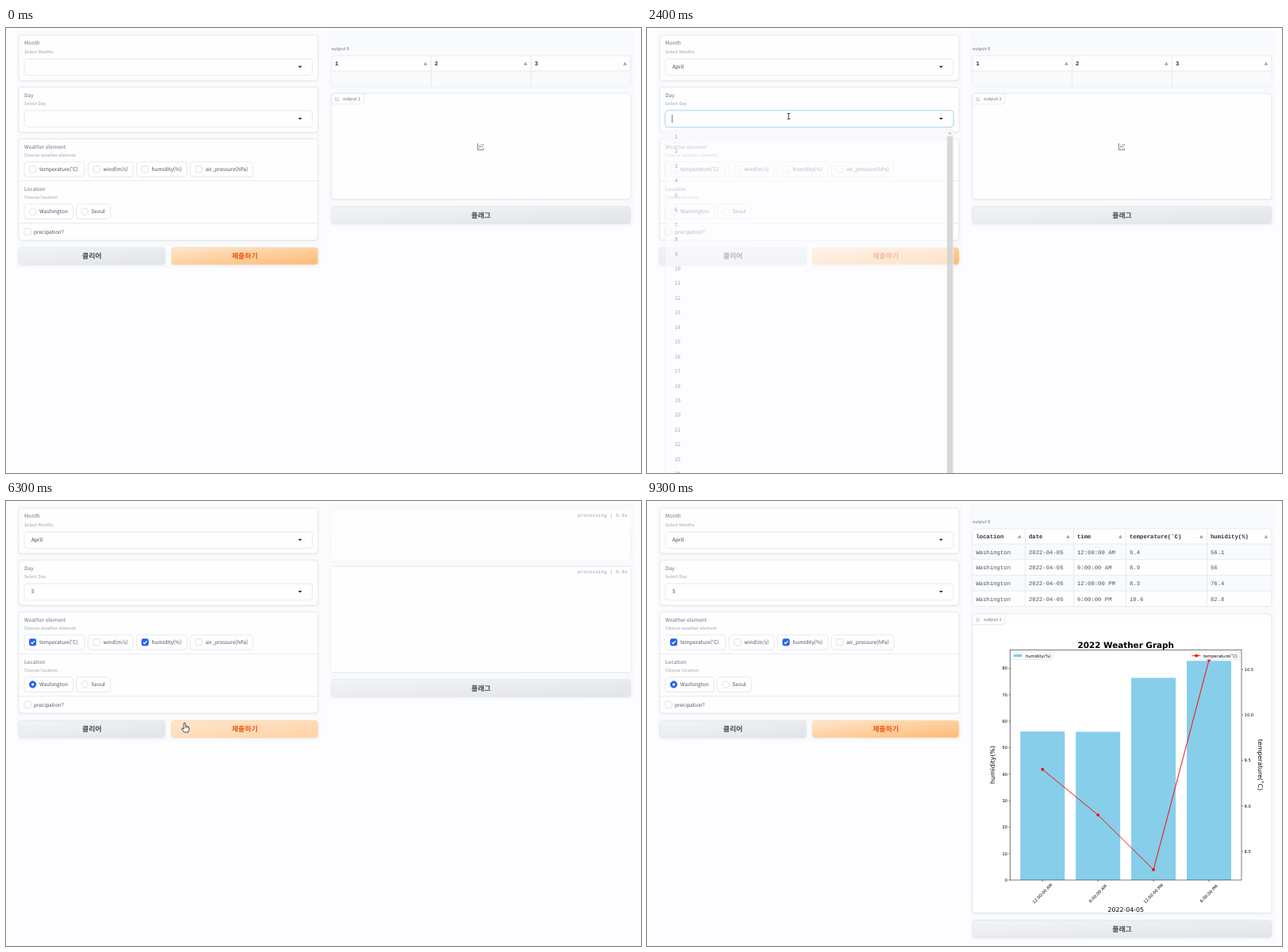
These frames come from a looping animation (800x560 px, 9.4 s). An HTML page with a canvas:

```html
<!DOCTYPE html>
<html lang="ko">
<head>
<meta charset="utf-8">
<title>Weather form</title>
<style>
html, body { margin: 0; width: 100%; height: 100%; overflow: hidden; background: #fdfdff; }
canvas { display: block; }
</style>
</head>
<body>
<canvas id="stage" width="800" height="560"></canvas>
<script>
const ctx = document.getElementById('stage').getContext('2d');
ctx.textRendering = 'geometricPrecision';
const LOOP = 9400, STEP = 100;
const SANS = '"Noto Sans CJK KR", "Noto Sans CJK JP", "Noto Sans CJK", "Noto Sans CJK SC", sans-serif';
const MONO = '"Liberation Mono", "Noto Sans Mono", monospace';
const PLOT = '"DejaVu Sans", sans-serif';
const CARD = '#fefeff', PANEL = '#f8fafc', LINE = '#e3e6eb';
const BODY = 6.5, SMALL = 5.55, CODE = 7.25;
const MONTHS = ['January', 'February', 'March', 'April', 'May', 'June', 'July',
  'August', 'September', 'October', 'November', 'December'];
const DAYS = Array.from({ length: 31 }, (_, i) => String(i + 1));
const TIMES = ['12:00:00 AM', '6:00:00 AM', '12:00:00 PM', '6:00:00 PM'];
const TEMPS = [9.4, 8.9, 8.3, 10.6];
const HUMIDITY = [56.1, 56, 76.4, 82.8];

// Moments of the clicks and of the answer.
const AT = { month: 870, april: 1650, day: 2348, five: 2950, blur: 3450,
  temperature: 3680, humidity: 4180, washington: 4680, submit: 5380, result: 6400 };

// Pointer path: time, x, y, and the shape used from that time on.
const PATH = [
  [300, 236, 190, 'arrow'], [700, 225, 56, 'beam'], [1000, 224.5, 50, 'beam'],
  [1200, 220, 52, 'hand'], [1600, 72, 121, 'hand'], [1800, 80, 121, 'arrow'],
  [2200, 176, 112, 'beam'], [2400, 178.5, 111, 'beam'], [2500, 174, 116, 'hand'],
  [2900, 62, 206, 'hand'], [3100, 64, 205, 'arrow'], [3400, 76, 186, 'hand'],
  [3600, 76.5, 181.5, 'hand'], [3750, 78, 181, 'arrow'], [4050, 186, 178, 'hand'],
  [4250, 186, 178, 'arrow'], [4600, 60, 229, 'hand'], [4800, 62, 230, 'arrow'],
  [5100, 130, 264, 'arrow'], [5200, 225, 278.5, 'hand'], [6300, 225, 279, 'hand'],
  [6450, 238, 308, 'arrow'], [6700, 243.5, 319, 'arrow'], [7200, 243.5, 319, 'arrow'],
  [7700, 590, 410, 'arrow'], [8100, 640, 470, 'arrow'], [8500, 602, 400, 'arrow'],
  [8900, 585, 565, 'arrow']
];

function text(str, x, y, { size = BODY, color = '#4b5563', weight = 400, font = SANS, align = 'left' } = {}) {
  ctx.font = `${weight} ${size}px ${font}`;
  ctx.fillStyle = color;
  ctx.textAlign = align;
  ctx.fillText(str, x, y + size * 0.366);
}

function turned(str, x, y, angle, style) {
  ctx.save();
  ctx.translate(x, y);
  ctx.rotate(angle);
  text(str, 0, 0, { font: PLOT, color: '#000', align: 'center', ...style });
  ctx.restore();
}

function rect(x1, y1, x2, y2, color) {
  ctx.fillStyle = color;
  ctx.fillRect(x1, y1, x2 - x1, y2 - y1);
}

function box(x1, y1, x2, y2, { fill = CARD, stroke = LINE, r = 4, shadow = 0, width = 0.8 } = {}) {
  ctx.beginPath();
  ctx.roundRect(x1, y1, x2 - x1, y2 - y1, r);
  ctx.save();
  if (shadow) {
    ctx.shadowColor = `rgba(40,50,70,${shadow})`;
    ctx.shadowBlur = 2;
    ctx.shadowOffsetY = 0.8;
  }
  ctx.fillStyle = fill;
  ctx.fill();
  ctx.restore();
  if (!stroke) return;
  ctx.strokeStyle = stroke;
  ctx.lineWidth = width;
  ctx.stroke();
}

function path(points, { fill, stroke, width = 0.8, close = false }) {
  ctx.beginPath();
  points.forEach(([x, y]) => ctx.lineTo(x, y));
  if (close) ctx.closePath();
  if (fill) { ctx.fillStyle = fill; ctx.fill(); }
  if (stroke) { ctx.strokeStyle = stroke; ctx.lineWidth = width; ctx.stroke(); }
}

const line = (x1, y1, x2, y2, stroke = LINE, width = 0.8) =>
  path([[x1, y1], [x2, y2]], { stroke, width });

function dot(x, y, r, fill, stroke) {
  ctx.beginPath();
  ctx.arc(x, y, r, 0, Math.PI * 2);
  ctx.fillStyle = fill;
  ctx.fill();
  if (stroke) { ctx.strokeStyle = stroke; ctx.lineWidth = 0.8; ctx.stroke(); }
}

// The shading runs from corner to corner, so on a wide button it is nearly vertical.
function button(label, x1, y1, x2, y2, from, to, color, edge) {
  const cx = (x1 + x2) / 2, cy = (y1 + y2) / 2, w = x2 - x1, h = y2 - y1;
  const reach = w * h / (w * w + h * h);
  const fill = ctx.createLinearGradient(cx - h * reach, cy - w * reach, cx + h * reach, cy + w * reach);
  fill.addColorStop(0, from);
  fill.addColorStop(1, to);
  box(x1, y1, x2, y2, { fill, stroke: edge, shadow: 0.1 });
  text(label, cx, cy, { size: 8.9, weight: 600, color, align: 'center' });
}

const grayButton = (label, x1, y1, x2, y2) =>
  button(label, x1, y1, x2, y2, '#f3f4f6', '#e1e4e8', '#414a58', '#e5e7eb');

function heading(label, info, y) {
  text(label, 23, y, { color: '#6b7280' });
  text(info, 23, y + 10.8, { size: SMALL, color: '#9ca3af' });
}

function dropdown(label, info, y, value, focused) {
  box(16, y, 393, y + 57, { shadow: 0.1 });
  heading(label, info, y + 10);
  if (focused) box(22.2, y + 28.8, 386.8, y + 51.2, { fill: '#e8f4fb', stroke: '#e2f1fa', r: 4.5, width: 1 });
  box(23, y + 29.5, 386, y + 50.5, { stroke: focused ? '#a6d3f0' : LINE });
  if (!focused) line(26, y + 30.4, 383, y + 30.4, '#f3f4f6');
  text(value, 32, y + 39.8, { color: '#374151' });
  if (focused && !value) line(31.8, y + 35, 31.8, y + 45, '#374151');
  path([[368, y + 38.8], [373, y + 38.8], [370.5, y + 41.3]], { fill: '#27272a', close: true });
}

function checkbox(x, y, on) {
  box(x, y, x + 8.3, y + 8.3, { r: 1.8, fill: on ? '#2563eb' : CARD, stroke: on ? '#2563eb' : '#d6dae0' });
  if (on) path([[x + 2, y + 4.3], [x + 3.6, y + 5.9], [x + 6.4, y + 2.6]], { stroke: '#fff', width: 1.2 });
}

const inside = (p, x1, y1, x2, y2) => p && p.x > x1 && p.x < x2 && p.y > y1 && p.y < y2;

function chip(label, x1, x2, y, on, pointer, radio) {
  const hover = inside(pointer, x1, y - 9.5, x2, y + 9.5);
  box(x1, y - 9.3, x2, y + 9.3, { fill: hover ? '#f5f6f8' : CARD, shadow: 0.06 });
  if (radio) {
    dot(x1 + 10.7, y, 4.2, on ? '#2563eb' : CARD, on ? '#2563eb' : '#d6dae0');
    if (on) dot(x1 + 10.7, y, 1.6, '#fff');
  } else checkbox(x1 + 6.5, y - 4.1, on);
  text(label, x1 + 19, y - 0.2);
}

function form(t, pointer) {
  rect(13, 4, 397, 302, PANEL);
  dropdown('Month', 'Select Months', 9, t >= AT.april ? 'April' : '', t >= AT.month - 50 && t < AT.day - 50);
  dropdown('Day', 'Select Day', 74.3, t >= AT.five ? '5' : '', t >= AT.day - 50 && t < AT.blur);
  box(16, 139.5, 393, 267, { shadow: 0.1 });
  heading('Weather element', 'Choose weather element', 149.6);
  chip('temperature(˚C)', 23, 99, 177.7, t >= AT.temperature, pointer);
  chip('wind(m/s)', 103.5, 160, 177.7, false, pointer);
  chip('humidity(%)', 164.5, 228, 177.7, t >= AT.humidity, pointer);
  chip('air_pressure(hPa)', 232.3, 311, 177.7, false, pointer);
  line(16, 192.3, 393, 192.3);
  heading('Location', 'Choose location', 202.6);
  chip('Washington', 23, 84.5, 230.9, t >= AT.washington, pointer, true);
  chip('Seoul', 88.5, 131.5, 230.9, false, pointer, true);
  line(16, 245.6, 393, 245.6);
  checkbox(23, 252.2, false);
  text('precipation?', 35, 256.3);
  grayButton('클리어', 16, 276.3, 200.5, 297.7);
  const hover = inside(pointer, 208, 276, 393, 298);
  button('제출하기', 208.5, 276.3, 393, 297.7, '#ffe6cc', hover ? '#fed3a5' : '#fdba74', '#ea580c', '#fed7aa');
}

// A list flies in by five pixels while it fades, then fades out again.
function options(t, open, close, names, top, pointer) {
  const out = t >= close;
  const k = Math.min(1, Math.max(0, (t - (out ? close : open)) / 200));
  const shown = out ? 1 - k : 1 - (1 - k) ** 3;
  if (t < open || shown <= 0) return;
  const row = 18.45, bottom = Math.min(575, top + row * names.length + 0.5);
  const over = pointer ? Math.floor((pointer.y - top) / row) : -1;
  const long = bottom > 560;
  ctx.save();
  ctx.globalAlpha = shown;
  ctx.translate(0, 5 * (1 - shown));
  box(23, top, 386, bottom, { stroke: '#eceef1', r: 2 });
  line(24, bottom + 0.6, 385, bottom + 0.6, '#dfe2e6');
  const lit = over > 0 && over < names.length ? over : 0;
  rect(23, top + lit * row, 386, top + (lit + 1) * row, '#f8f9fb');
  names.forEach((name, i) => text(name, 35, top + (i + 0.5) * row, { color: '#5b6472' }));
  if (long) {
    rect(378, top, 385.3, bottom, '#f2f2f2');
    rect(378, top + 9, 385.3, bottom, '#c4c4c4');
    path([[379.8, top + 6], [383.6, top + 6], [381.7, top + 3.6]], { fill: '#8a8a8a', close: true });
  }
  ctx.restore();
}

function chartIcon(x, y, s, color) {
  path([[x, y], [x, y + s], [x + s, y + s]], { stroke: color, width: s / 9 });
  path([[x + s * 0.2, y + s * 0.75], [x + s * 0.45, y + s * 0.45], [x + s * 0.62, y + s * 0.58], [x + s * 0.95, y + s * 0.1]],
    { stroke: color, width: s / 10 });
  [[0.2, 0.3], [0.5, 0.12], [0.8, 0.75]].forEach(([u, v]) => rect(x + s * u, y + s * v, x + s * (u + 0.13), y + s * (v + 0.13), color));
}

function table(edges, heads, rows) {
  const top = 35, head = 54, step = 19.7, bottom = head + step * rows.length;
  box(410, top, 787, bottom, { r: 3 });
  rows.forEach((cells, r) => {
    const y = head + r * step;
    if (r % 2 === 0) rect(410.4, y, 786.6, y + step - 0.4, '#f8fafb');
    line(410, y, 787, y);
    cells.forEach((cell, c) => text(cell, edges[c] + 4.5, y + step / 2, { size: CODE, font: MONO, color: '#4b5563' }));
  });
  heads.forEach((name, c) => {
    const end = edges[c + 1];
    text(name, edges[c] + 4.5, 44.4, { size: CODE, font: MONO, weight: 700, color: '#27303d' });
    path([[end - 9.4, 46.7], [end - 4.8, 46.7], [end - 7.1, 42.4]], { fill: '#9ca3af', close: true });
    if (c < heads.length - 1) line(end, top, end, bottom);
  });
}

function legend(x1, x2, label, textX, mark) {
  box(x1, 190, x2, 199.6, { fill: 'rgba(255,255,255,.85)', stroke: '#d4d4d4', r: 1, width: 0.5 });
  mark();
  text(label, textX, 194.6, { size: 5.2, font: PLOT, color: '#000' });
}

function chart() {
  const left = 457.5, right = 749, top = 187.5, base = 477;
  const xs = i => 498.3 + i * 69.9;
  const humY = v => base - v * 3.331;
  const tempY = v => 441 - (v - 8.5) * 114.7;
  const tick = { size: 5.2, font: PLOT, color: '#000' };
  rect(411, 158, 786, 517, '#fff');
  HUMIDITY.forEach((v, i) => rect(xs(i) - 28, humY(v), xs(i) + 28, base, '#87ceeb'));
  legend(459.7, 511.5, 'humidity(%)', 477, () => rect(462, 192.8, 472.4, 196.4, '#87ceeb'));
  path(TEMPS.map((v, i) => [xs(i), tempY(v)]), { stroke: '#f00', width: 0.95 });
  TEMPS.forEach((v, i) => dot(xs(i), tempY(v), 1.9, '#f00'));
  legend(684.5, 746.5, 'temperature(˚C)', 701, () => {
    line(687, 194.7, 697.4, 194.7, '#f00', 0.95);
    dot(692.2, 194.7, 1.9, '#f00');
  });
  ctx.strokeStyle = '#222';
  ctx.lineWidth = 0.6;
  ctx.strokeRect(left, top, right - left, base - top);
  for (let v = 0; v <= 80; v += 10) {
    line(left - 1.9, humY(v), left, humY(v), '#222', 0.6);
    text(String(v), 454, humY(v), { ...tick, align: 'right' });
  }
  for (let v = 8.5; v <= 10.5; v += 0.5) {
    line(right, tempY(v), right + 1.9, tempY(v), '#222', 0.6);
    text(v.toFixed(1), 752.6, tempY(v), tick);
  }
  TIMES.forEach((name, i) => {
    line(xs(i), base, xs(i), base + 1.9, '#222', 0.6);
    turned(name, xs(i) - 0.3, 494, -Math.PI / 4, { size: 5.2 });
  });
  text('2022 Weather Graph', 603.2, 180.8, { size: 10.4, weight: 700, font: PLOT, color: '#000', align: 'center' });
  text('2022-04-05', 603.2, 513.8, { size: 7.8, font: PLOT, color: '#000', align: 'center' });
  turned('humidity(%)', 435.3, 332, -Math.PI / 2, { size: 7.8 });
  turned('temperature(˚C)', 773, 332, Math.PI / 2, { size: 7.8 });
}

function waiting(t, y1, y2) {
  rect(409.6, y1, 786.6, y2, CARD);
  const seconds = ((t - AT.submit) / 1000).toFixed(1);
  text(`processing | ${seconds}s`, 783, y1 + 6, { size: 6.2, font: MONO, color: '#9ca3af', align: 'right' });
}

function output(t) {
  const done = t >= AT.result, busy = t >= AT.submit && !done;
  const top = done ? 142 : 82.3, bottom = done ? 518.5 : 215.5;
  rect(406, 4, 791, done ? 553 : 250, PANEL);
  text('output 0', 410, 25.8, { size: SMALL, color: '#6b7280' });
  if (done) {
    table([410, 476.5, 537.5, 603.5, 705.5, 787],
      ['location', 'date', 'time', 'temperature(˚C)', 'humidity(%)'],
      TIMES.map((time, i) => ['Washington', '2022-04-05', time, String(TEMPS[i]), String(HUMIDITY[i])]));
  } else table([410, 535.5, 661.5, 787], ['1', '2', '3'], [['', '', '']]);
  box(410, top, 787, bottom, { shadow: 0.1 });
  if (done) chart();
  else chartIcon(594.2, 145, 8.2, '#6b7280');
  box(410, top, 451, top + 13.5, { r: [4, 0, 4, 0] });
  chartIcon(415, top + 4.4, 4.8, '#9ca3af');
  text('output 1', 424.3, top + 6.6, { size: SMALL, color: '#6b7280' });
  if (busy) {
    waiting(t, 12, 74.2);
    waiting(t, 83, 215);
  }
  grayButton('플래그', 410, bottom + 9, 787, bottom + 30.7);
}

function locate(t) {
  const i = PATH.findIndex(([time]) => time > t) - 1;
  if (i < 0) return null;
  const [t1, x1, y1, kind] = PATH[i], [t2, x2, y2] = PATH[i + 1];
  const k = (t - t1) / (t2 - t1), e = k * k * (3 - 2 * k);
  return { x: x1 + (x2 - x1) * e, y: y1 + (y2 - y1) * e, kind };
}

function drawPointer({ x, y, kind }) {
  ctx.save();
  ctx.translate(x, y);
  ctx.lineJoin = 'round';
  if (kind === 'beam') {
    [-3.5, 3.5].forEach(end => line(-1.8, end, 1.8, end, '#222'));
    line(0, -3.5, 0, 3.5, '#222');
  } else if (kind === 'arrow') {
    path([[0, 0], [0, 8.6], [2, 6.8], [3.3, 9.8], [4.6, 9.2], [3.4, 6.3], [6, 6.2]],
      { fill: '#fff', stroke: '#222', close: true });
  } else {
    path([[-1, 0.6], [0, 0], [1, 0.6], [1.2, 4.2], [3, 4.4], [4.6, 5], [5.7, 6], [5.7, 8.4],
      [4.6, 12], [-0.6, 12], [-3.6, 7.8], [-3, 6.7], [-1, 8]], { fill: '#fff', stroke: '#222', close: true });
    [1.2, 2.9, 4.5].forEach(u => line(u, 4.8, u, 6.8, '#222', 0.6));
  }
  ctx.restore();
}

function draw(t) {
  const pointer = locate(t);
  rect(0, 0, 800, 560, '#fdfdff');
  form(t, pointer);
  output(t);
  options(t, AT.month, AT.april, MONTHS, 60, pointer);
  options(t, AT.day, AT.five, DAYS, 125.3, pointer);
  if (pointer) drawPointer(pointer);
}

const start = performance.now();
function tick() {
  const t = (performance.now() - start) % LOOP;
  draw(Math.floor(t / STEP) * STEP);
  requestAnimationFrame(tick);
}
tick();
</script>
</body>
</html>
```
